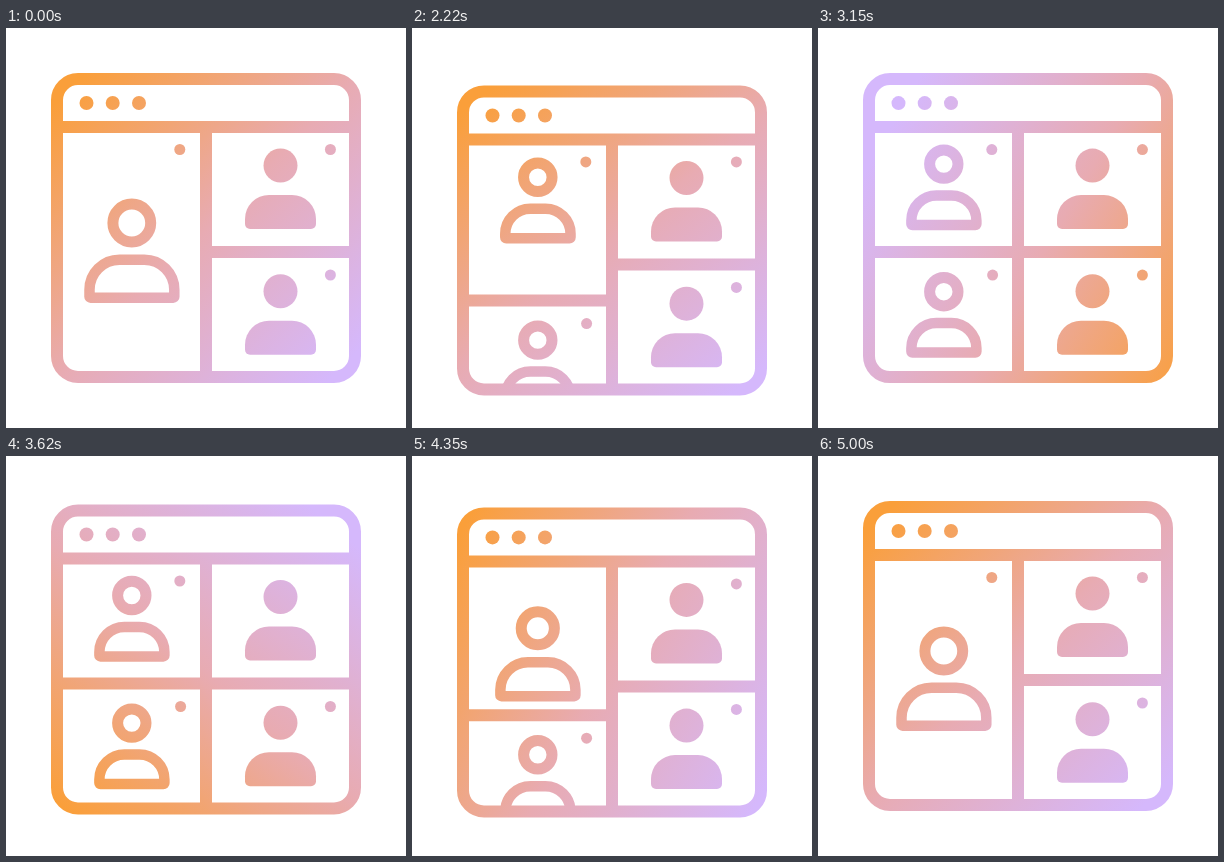
Animation of 400x400 px, one loop 5020 ms. Source, as an HTML page with a canvas:

```html
<!DOCTYPE html>
<html lang="en">
<head>
<meta charset="utf-8">
<title>Video call window</title>
<style>
html, body { margin: 0; height: 100%; overflow: hidden; background: #fff; }
canvas { display: block; }
</style>
</head>
<body>
<canvas id="stage" width="400" height="400"></canvas>
<script>
const LOOP = 5020, REST = 2020;
const ctx = document.getElementById('stage').getContext('2d');

const mix = (a, b, p) => a + (b - a) * p;
const span = (t, from, to) => Math.min(1, Math.max(0, (t - from) / (to - from)));
const ease = x => (1 - Math.cos(Math.PI * x)) / 2;
const between = (t, from, to) => t >= from && t < to;

// Cubic bezier easing with control points (x1, 0) and (x2, 1)
function bezier(x, x1, x2) {
  let lo = 0, hi = 1;
  for (let i = 0; i < 24; i++) {
    const s = (lo + hi) / 2, r = 1 - s;
    if (3 * r * r * s * x1 + 3 * r * s * s * x2 + s * s * s < x) lo = s; else hi = s;
  }
  return lo * lo * (3 - 2 * lo);
}

// The window drops quickly and settles back more slowly
const dip = (t, start, depth, down, up) =>
  depth * (ease(span(t, start, start + down)) - ease(span(t, start + down, start + down + up)));

function gradient(t) {
  const turn = 2 * Math.PI * bezier(span(t, 1990, 5000), .38, .37);
  const angle = Math.PI / 4 + turn;
  const dx = Math.cos(angle), dy = Math.sin(angle);
  const shift = -35 * Math.sin(turn / 2) ** 4;
  const a = shift - 195, b = shift + 195;
  const g = ctx.createLinearGradient(200 + dx * a, 200 + dy * a, 200 + dx * b, 200 + dy * b);
  g.addColorStop(0, '#fa9f3a');
  g.addColorStop(.5, '#e8abb2');
  g.addColorStop(1, '#d5b8fc');
  return g;
}

function dot(x, y, r) {
  ctx.beginPath();
  ctx.arc(x, y, r, 0, 2 * Math.PI);
  ctx.fill();
}

function line(x1, y1, x2, y2) {
  ctx.lineWidth = 12;
  ctx.beginPath();
  ctx.moveTo(x1, y1);
  ctx.lineTo(x2, y2);
  ctx.stroke();
}

function solidPerson(y) {
  dot(274.5, y, 17);
  ctx.beginPath();
  ctx.roundRect(239, y + 29.5, 71, 34, [24, 24, 5, 5]);
  ctx.fill();
}

// size 0 is the large figure, 1 the small one
function outlinePerson(size, dy) {
  const left = mix(83.5, 93.4, size), top = mix(231.7, 167.4, size) + dy;
  ctx.lineWidth = 11;
  ctx.beginPath();
  ctx.arc(125.8, mix(195, 136, size) + dy, mix(18.9, 14.2, size), 0, 2 * Math.PI);
  ctx.stroke();
  const r = mix(30, 25, size);
  ctx.lineWidth = 10.5;
  ctx.beginPath();
  ctx.roundRect(left, top, 2 * (125.9 - left), mix(38, 29.5, size), [r, r, 1, 1]);
  ctx.stroke();
}

function draw(t) {
  if (t < REST) t = 0;
  const bob = dip(t, 1985, 13, 180, 420) + dip(t, 3100, 3.5, 520, 530) + dip(t, 4262, 13, 180, 420);
  const small = ease(span(t, 1980, 2240)) - ease(span(t, 4220, 4480));
  const rise = ease(span(t, 1985, 2350)) - ease(span(t, 4220, 4640));
  const drop = 130 * (1 - rise);

  ctx.clearRect(0, 0, 400, 400);
  ctx.fillStyle = ctx.strokeStyle = gradient(t);
  ctx.lineJoin = 'round';
  ctx.save();
  ctx.translate(0, bob);

  // Window frame
  ctx.lineWidth = 12;
  ctx.beginPath();
  ctx.roundRect(51, 51, 298, 298, 21);
  ctx.stroke();
  line(51, 99, 349, 99);
  line(200, 99, 200, 349);
  line(200, 224, 349, 224);
  for (const x of [80.5, 106.7, 133]) dot(x, 75, 7);

  // Right column
  solidPerson(137.5);
  solidPerson(263.2);
  if (!between(t, 3500, 3750)) dot(324.4, 121.5, 5.5);
  dot(324.4, 247, 5.5);

  // Upper left
  outlinePerson(small, 0);
  if (!between(t, 4220, 4480)) dot(173.8, 121.5, 5.5);

  // Lower left panel slides in from below
  ctx.beginPath();
  ctx.roundRect(51, 51, 298, 298, 21);
  ctx.clip();
  line(51, 224 + drop, 200, 224 + drop);
  ctx.beginPath();
  ctx.rect(51, 99, 149, 246);
  ctx.clip();
  outlinePerson(1, 127.6 + drop);
  dot(174.6, 247 + drop, 5.5);
  ctx.restore();
}

const begin = performance.now();
function tick() {
  draw((performance.now() - begin) % LOOP);
  requestAnimationFrame(tick);
}
tick();
</script>
</body>
</html>
```
